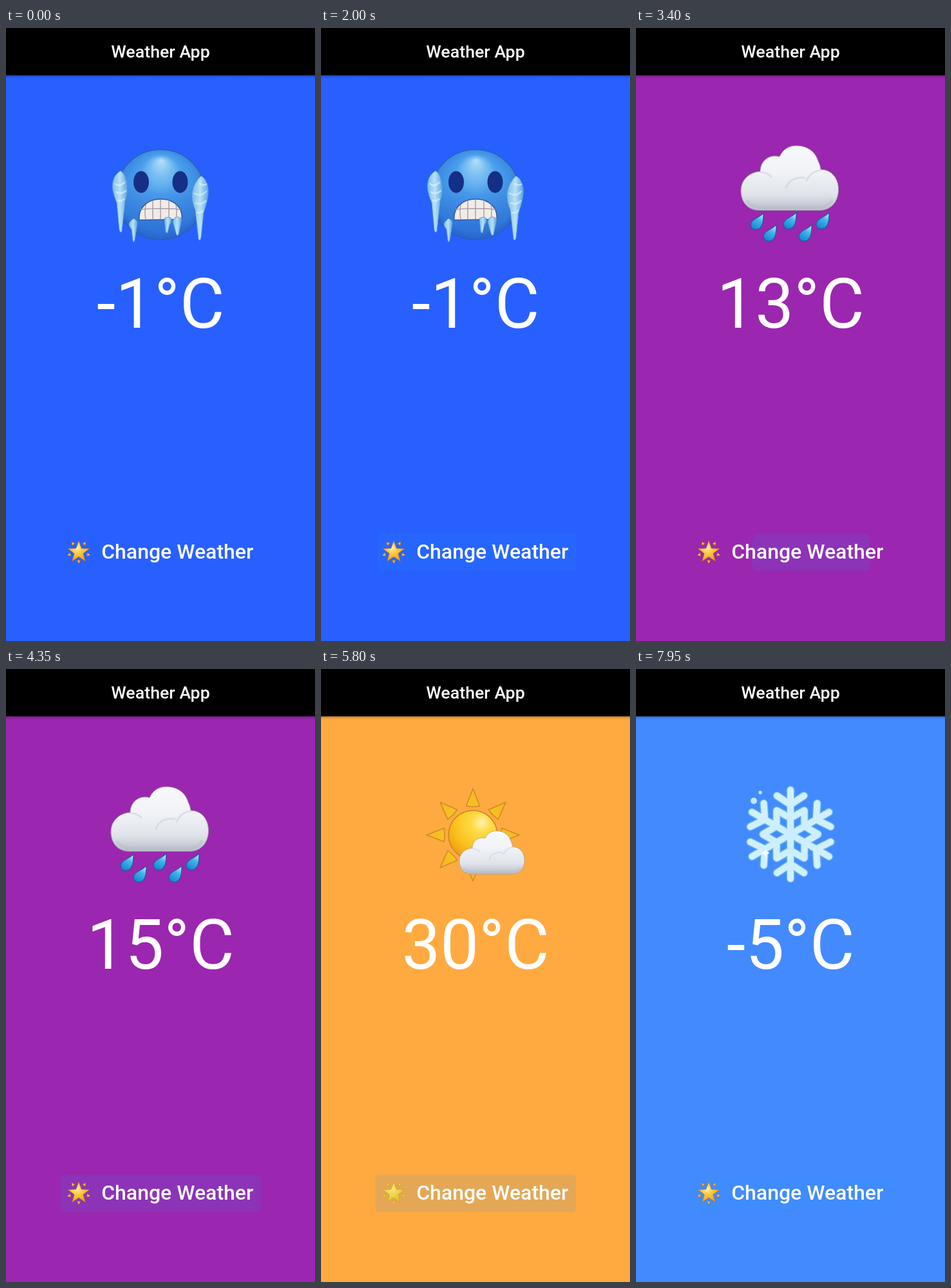
These frames come from a looping animation (480 by 953 pixels, 8000 ms). An HTML page:

```html
<!DOCTYPE html>
<html lang="en">
<head>
<meta charset="utf-8">
<title>Weather App</title>
<style>
  html, body { margin: 0; width: 100%; height: 100%; overflow: hidden; background: #000; }
  svg { display: block; width: 100vw; height: 100vh; }
  text { font-family: Roboto, sans-serif; fill: #fff; text-anchor: middle; }
</style>
</head>
<body>
<svg viewBox="0 0 480 953" xmlns="http://www.w3.org/2000/svg">
  <defs>
    <linearGradient id="shade" x1="0" y1="0" x2="0" y2="1">
      <stop offset="0" stop-color="#000" stop-opacity=".36"/>
      <stop offset=".4" stop-color="#000" stop-opacity=".12"/>
      <stop offset="1" stop-color="#000" stop-opacity="0"/>
    </linearGradient>
    <radialGradient id="skin" gradientUnits="userSpaceOnUse" cx="240" cy="258" fx="241" fy="205" r="71">
      <stop offset="0" stop-color="#b4e0fa"/>
      <stop offset=".2" stop-color="#7cc0f3"/>
      <stop offset=".45" stop-color="#4a9fec"/>
      <stop offset=".9" stop-color="#3a8ae2"/>
      <stop offset="1" stop-color="#2a68c4"/>
    </radialGradient>
    <linearGradient id="chin" x1="0" y1="0" x2="0" y2="1">
      <stop offset=".4" stop-color="#2663d0" stop-opacity="0"/>
      <stop offset="1" stop-color="#2663d0" stop-opacity=".7"/>
    </linearGradient>
    <linearGradient id="ice" x1="0" y1="0" x2="1" y2="0">
      <stop offset="0" stop-color="#7abbe9"/>
      <stop offset=".5" stop-color="#b9e1f6"/>
      <stop offset="1" stop-color="#5ba4e0"/>
    </linearGradient>
    <linearGradient id="vapour" x1="0" y1="0" x2="0" y2="1">
      <stop offset="0" stop-color="#f7f8fb"/>
      <stop offset=".4" stop-color="#f1f3f6"/>
      <stop offset=".75" stop-color="#e0e4ea"/>
      <stop offset="1" stop-color="#b9bdca"/>
    </linearGradient>
    <linearGradient id="water" x1=".8" y1="0" x2=".3" y2="1">
      <stop offset="0" stop-color="#c4ecfb"/>
      <stop offset=".4" stop-color="#44b4ec"/>
      <stop offset="1" stop-color="#1385d2"/>
    </linearGradient>
    <radialGradient id="sun" cx=".68" cy=".25" r=".8">
      <stop offset="0" stop-color="#fff3b0"/>
      <stop offset=".25" stop-color="#ffdb45"/>
      <stop offset=".7" stop-color="#fbc11c"/>
      <stop offset="1" stop-color="#f0a016"/>
    </radialGradient>
    <linearGradient id="beam" x1="0" y1="0" x2="0" y2="1">
      <stop offset="0" stop-color="#f3b62a"/>
      <stop offset="1" stop-color="#f7c21d"/>
    </linearGradient>
    <radialGradient id="gold" cx=".42" cy=".35" r=".65">
      <stop offset="0" stop-color="#fff2ac"/>
      <stop offset=".4" stop-color="#fbcb45"/>
      <stop offset="1" stop-color="#efa01c"/>
    </radialGradient>
    <radialGradient id="lime" cx=".42" cy=".35" r=".65">
      <stop offset="0" stop-color="#f6e77a"/>
      <stop offset="1" stop-color="#e3bf1c"/>
    </radialGradient>
    <linearGradient id="frost" gradientUnits="userSpaceOnUse" x1="0" y1="-76" x2="0" y2="76">
      <stop offset="0" stop-color="#d3f1fe"/>
      <stop offset="1" stop-color="#c2eafc"/>
    </linearGradient>
    <clipPath id="button"><rect x="84.5" y="786" width="311.5" height="58" rx="5"/></clipPath>
    <g id="cloud">
      <path d="M192 283.500C172 283.500 163 269 163 253C163 236 176 224 193 223C193 209 203 199 216 199Q220 199 223 200C228 189 237 183 249 183C267 183 279 193 283 207Q286 212 287 220C304 220 314.500 234 314.500 251C314.500 270 303 283.500 285 283.500Z" fill="url(#vapour)" stroke="#9b9aa8" stroke-width="1"/>
      <path d="M265 237Q272 222 288 221M233 248Q240 231 262 233M193 224Q203 224 210 231" fill="none" stroke="#c3c8d2" stroke-width="3" stroke-linecap="round" opacity=".45"/>
      <path d="M172 268Q180 278 194 279H284Q298 278 305 267" fill="none" stroke="#a9aebd" stroke-width="5" opacity=".25"/>
    </g>
    <path id="drop" d="M10-13C10-1 9 12-2 12.500C-10 12.500-11.500 4-8 0C-4-5 4-7 10-13Z" fill="url(#water)" stroke="#235d9d" stroke-width="1.300"/>
    <path id="ray" d="M0-72L10.500-45Q0-43-10.500-45Z" fill="url(#beam)" stroke="#d18b28" stroke-width="1.600" stroke-linejoin="round"/>
    <path id="arm" d="M0 0V-69M-21-60L0-46L21-60M-21-37L0-25L21-37" fill="none" stroke-linecap="round" stroke-linejoin="round"/>
  </defs>

  <rect id="sky" width="480" height="953"/>
  <rect y="73" width="480" height="6" fill="url(#shade)"/>
  <rect width="480" height="73.5"/>
  <text x="240" y="46" font-size="26.667" font-weight="500" letter-spacing=".05">Weather App</text>

  <g id="cold">
    <circle cx="240" cy="259" r="70" fill="url(#skin)"/>
    <circle cx="240" cy="259" r="70" fill="url(#chin)" stroke="#2a5fb6" stroke-width="1.400"/>
    <g fill="#152f86">
      <ellipse cx="210" cy="239.500" rx="12" ry="17"/>
      <ellipse cx="270.500" cy="239.500" rx="12" ry="17"/>
    </g>
    <path d="M207 298.500C205 280 219 266 240.500 266C262 266 275 280 273 297.500Z" fill="#f1ecea" stroke="#37569f" stroke-width="1.600" stroke-linejoin="round"/>
    <path d="M209 282Q240 279 271 282M217 275Q215 287 217 297M228 268V297M240 267V297M253 268V297M264 274Q266 286 264 297" fill="none" stroke="#ab9fa3" stroke-width="1.500"/>
    <g fill="url(#ice)" stroke="#5299d9" stroke-width=".8">
      <path d="M178 222Q186 227 188 244Q190 256 185 270L180 316Q178 320 176 314L172 272Q163 250 166 239Q168 228 178 222Z"/>
      <path d="M303 230Q292 240 289 256Q288 269 294 283L299 328Q301 333 303 326L307 287Q316 262 314 248Q311 234 303 230Z"/>
      <path d="M198 296Q205 299 204 305L200 330Q198 335 197 330L195 313Q189 306 192 302Z"/>
      <path d="M246 296Q252 292 257 296Q258 301 254 306L251 318Q249 320 248 316Z"/>
      <path d="M261 296Q268 291 273 297L268 321Q266 325 264 319L259 301Z"/>
    </g>
    <path d="M169 242Q176 248 184 240M171 255Q178 260 186 253M174 268Q178 271 183 266M293 257Q303 263 311 254M295 272Q303 276 310 269M297 287Q302 289 306 284M301 242Q306 246 311 243" fill="none" stroke="#e4f5fd" stroke-width="2.500" stroke-linecap="round" opacity=".6"/>
  </g>

  <g id="rain"><use href="#cloud"/></g>

  <g id="sunny">
    <g id="rays" transform="translate(236 258)"></g>
    <circle cx="236" cy="258" r="38" fill="url(#sun)" stroke="#cc861f" stroke-width="1.500"/>
    <use href="#cloud" transform="translate(106 129.500) scale(.668)"/>
  </g>

  <g id="snow">
    <g id="flake" transform="translate(240 257)"></g>
    <g fill="#bfe8fc">
      <circle cx="183" cy="205" r="5"/>
      <circle cx="193" cy="192" r="2.700"/>
    </g>
    <path d="M201 279L203 284L208 286L203 288L201 293L199 288L194 286L199 284Z" fill="#f5fdff"/>
  </g>

  <text id="temp" x="240" y="466" font-size="106.667"></text>

  <g clip-path="url(#button)"><circle id="ripple" fill="#2196f3"/></g>
  <g id="star" transform="translate(113 814)" stroke="#b9731c" stroke-width=".7" stroke-linejoin="round"></g>
  <text x="266.200" y="824.700" font-size="32" font-weight="500">Change Weather</text>
</svg>
<script>
const LOOP = 8000;
const $ = id => document.getElementById(id);
const clamp = v => Math.max(0, Math.min(1, v));
const mix = (a, b, k) => a + (b - a) * k;

const scenes = [
  { at: 0, icon: 'cold', temp: '-1°C', sky: '#2860ff' },
  { at: 2090, icon: 'rain', temp: '13°C', sky: '#9b26af' },
  { at: 4140, icon: 'rain', temp: '15°C', sky: '#9b26af' },
  { at: 5740, icon: 'sunny', temp: '30°C', sky: '#ffaa40' },
  { at: 7790, icon: 'snow', temp: '-5°C', sky: '#448aff' }
];
// each press ends when the next scene appears
const presses = [1305, 3156, 5062, 6695];
const icons = ['cold', 'rain', 'sunny', 'snow'];

// cubic-bezier(.25, .1, .25, 1)
function ease(x) {
  if (x <= 0 || x >= 1) return clamp(x);
  const curve = (a, b, u) => 3 * a * u * (1 - u) ** 2 + 3 * b * u * u * (1 - u) + u ** 3;
  let lo = 0, hi = 1;
  for (let i = 0; i < 24; i++) {
    const mid = (lo + hi) / 2;
    if (curve(.25, .25, mid) < x) lo = mid; else hi = mid;
  }
  return curve(.1, 1, lo);
}

function build() {
  const drops = [[188, 301], [239, 300], [290, 300], [208, 319], [263, 319]];
  $('rain').innerHTML += drops.map(([x, y]) => `<use href="#drop" x="${x}" y="${y}"/>`).join('');

  const spin = (n, id) => Array.from({ length: n }, (_, i) =>
    `<use href="#${id}" transform="rotate(${i * 360 / n})"/>`).join('');
  $('rays').innerHTML = spin(8, 'ray');
  $('flake').innerHTML =
    `<g stroke="#63b3ee" stroke-width="13">${spin(6, 'arm')}</g>` +
    `<g stroke="url(#frost)" stroke-width="10">${spin(6, 'arm')}</g>`;

  const points = Array.from({ length: 10 }, (_, i) => {
    const a = i * Math.PI / 5, r = i % 2 ? 7.2 : 17.5;
    return `${(r * Math.sin(a)).toFixed(2)},${(.8 - r * Math.cos(a)).toFixed(2)}`;
  }).join(' ');
  let star = `<polygon points="${points}"/>`;
  for (let i = 0; i < 5; i++)
    star += `<path d="M0-18.500L2.600-13.500H-2.600Z" transform="rotate(${36 + i * 72})"/>`;
  $('star').innerHTML = star;
}

function drawRipple(t) {
  let i = presses.length - 1;
  while (i >= 0 && presses[i] > t) i--;
  const dot = $('ripple');
  if (i < 0) return dot.setAttribute('fill-opacity', 0);
  const start = presses[i], end = scenes[i + 1].at;
  const held = Math.min(t, end) - start, after = Math.max(0, t - end);
  const k = ease(clamp(held / 1000 + after / 225));
  dot.setAttribute('cx', mix(293, 240, k));
  dot.setAttribute('cy', mix(818, 815, k));
  dot.setAttribute('r', mix(47, 163, k));
  dot.setAttribute('fill-opacity', .12 * clamp(held / 75) * (1 - clamp((after - 225) / 150)));
}

function draw(t) {
  const scene = scenes.filter(s => s.at <= t).pop();
  $('sky').setAttribute('fill', scene.sky);
  $('temp').textContent = scene.temp;
  for (const id of icons) $(id).style.display = id === scene.icon ? '' : 'none';
  const warm = scene.icon === 'sunny';
  $('star').setAttribute('fill', warm ? 'url(#lime)' : 'url(#gold)');
  $('star').setAttribute('stroke', warm ? '#d3a41e' : '#b9731c');
  drawRipple(t);
}

build();
draw(0);
const begin = performance.now();
requestAnimationFrame(function tick() {
  draw((performance.now() - begin) % LOOP);
  requestAnimationFrame(tick);
});
</script>
</body>
</html>
```
